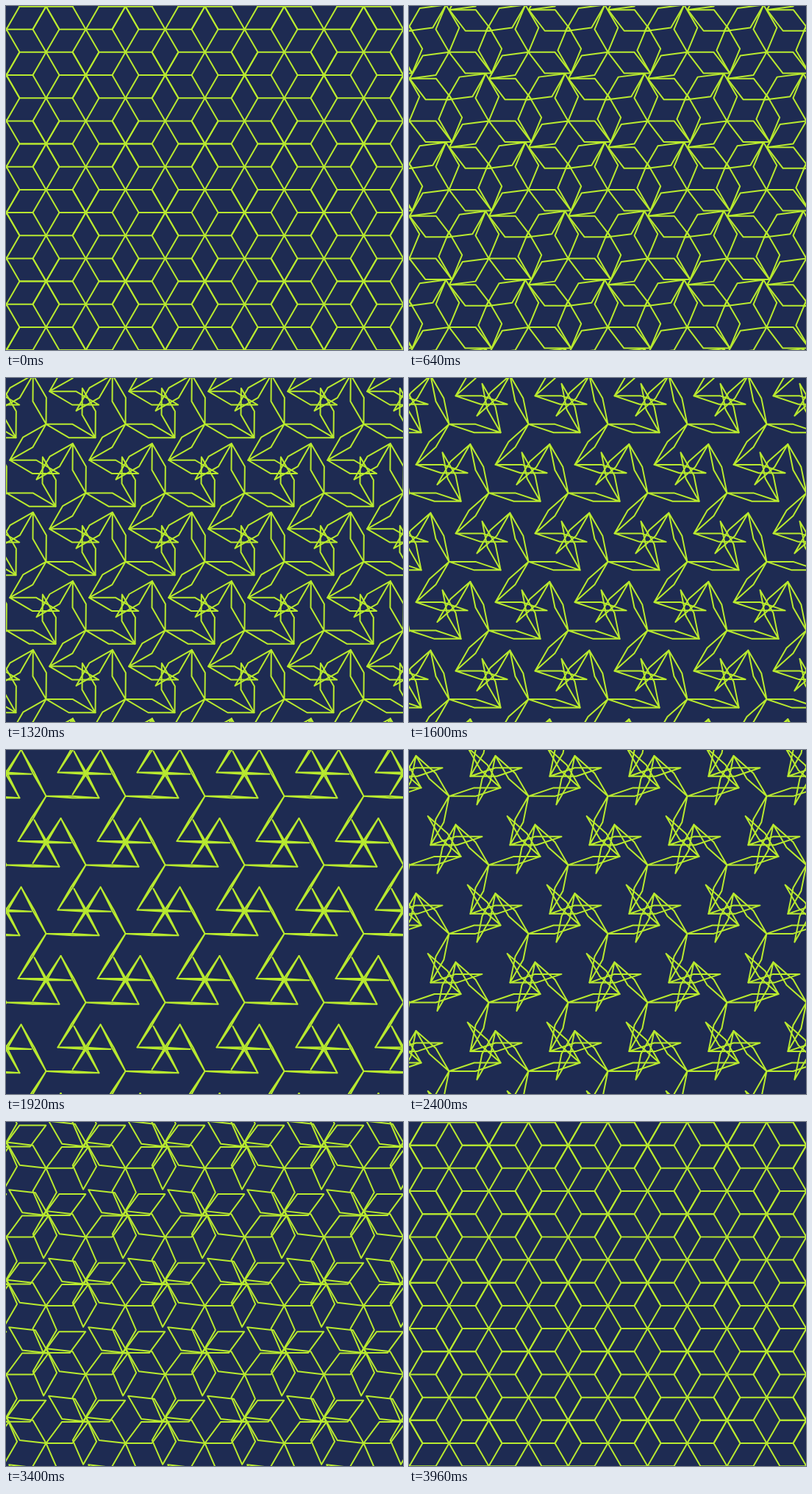
An HTML page with a canvas for the animation above (4 s loop, 540 by 468 pixels).

```html
<!DOCTYPE html>
<html lang="en">
<head>
<meta charset="utf-8">
<title>Hinged rhombi</title>
<style>
  html, body { margin: 0; width: 100%; height: 100%; overflow: hidden; background: #1e2b52; }
  canvas { display: block; width: 540px; height: 468px; }
</style>
</head>
<body>
<canvas id="stage" width="540" height="468"></canvas>
<script>
const ctx = document.getElementById('stage').getContext('2d');
const W = 540, H = 468, LOOP = 4000;
const SIDE = 36;
const ROW = SIDE * Math.sqrt(3) / 2;
const RAD = Math.PI / 180;

const arm = deg => [SIDE * Math.cos(deg * RAD), SIDE * Math.sin(deg * RAD)];

// Strokes a rhombus spanned by two arms and returns its far corner.
function rhombus(x, y, a, b) {
  const [ax, ay] = arm(a), [bx, by] = arm(b);
  const tip = [x + ax + bx, y + ay + by];
  ctx.beginPath();
  ctx.moveTo(x, y);
  ctx.lineTo(x + ax, y + ay);
  ctx.lineTo(...tip);
  ctx.lineTo(x + bx, y + by);
  ctx.closePath();
  ctx.stroke();
  return tip;
}

// Three pairs of linked rhombi around a fixed hub; one arm of each swings.
function hub(x, y, swing) {
  for (let turn = 0; turn < 360; turn += 120) {
    const [tx, ty] = rhombus(x, y, turn - 120, turn - 60 - swing);
    rhombus(tx, ty, turn + 120, turn + 180 - swing);
  }
}

function draw(now) {
  const p = (now % LOOP) / LOOP;
  const swing = 60 * (1 - Math.cos(Math.PI * p));
  ctx.setTransform(1, 0, 0, 1, 0, 0);
  ctx.fillStyle = '#1e2b52';
  ctx.fillRect(0, 0, W, H);
  ctx.translate(0.5, 0.5); // pixel centres
  ctx.strokeStyle = '#b9ea2f';
  ctx.lineWidth = 2;
  ctx.lineJoin = 'round';
  for (let j = -2; j <= 6; j++) {
    const shift = j % 2 ? 0 : SIDE * 1.5;
    for (let i = -2; i <= 7; i++) {
      hub(i * SIDE * 3 + shift, (2 + 3 * j) * ROW, swing);
    }
  }
}

function frame() {
  draw(performance.now());
  requestAnimationFrame(frame);
}
frame();
</script>
</body>
</html>
```
